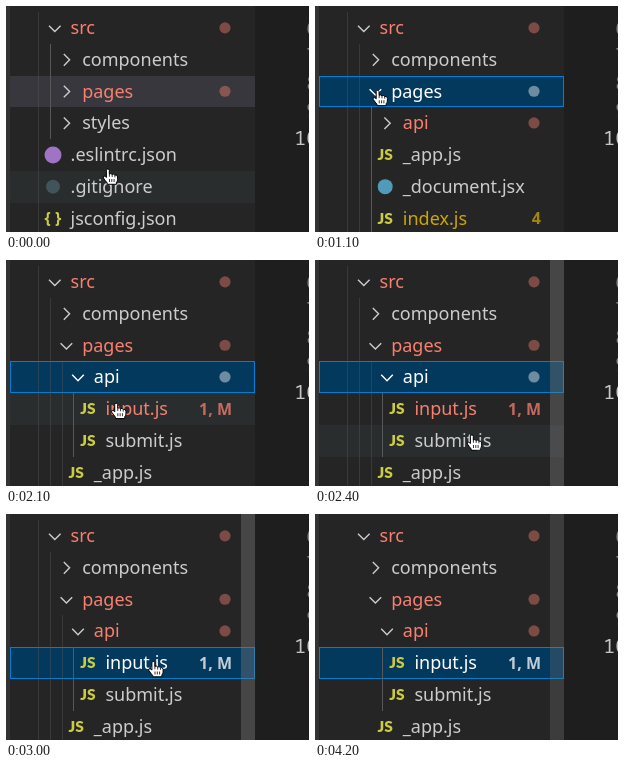
Recreate the animation shown at these times as an HTML page. Size 303 px wide and 226 px high, loop 4300 ms.

```html
<!DOCTYPE html>
<html lang="en">
<head>
<meta charset="utf-8">
<title>File explorer</title>
<style>
  html, body { margin: 0; width: 100%; height: 100%; overflow: hidden; background: #1e1e1e; }
  svg { display: block; width: 303px; height: 226px; }
  text { white-space: pre; }
  .label { font: 18px "Noto Sans", "Open Sans", sans-serif; }
  .badge { font: 700 16px "Noto Sans", "Open Sans", sans-serif; text-anchor: end; opacity: .75; }
  .js { font: 900 15.5px Lato, "Noto Sans", sans-serif; text-anchor: middle; }
  .json { font: 700 16px "Noto Sans", sans-serif; text-anchor: middle; }
  .num { font: 20.3px "Noto Sans Mono", "DejaVu Sans Mono", monospace; }
</style>
</head>
<body>
<svg viewBox="0 0 303 226" width="303" height="226">
  <rect width="303" height="226" fill="#1e1e1e"/>
  <rect width="4" height="226" fill="#333"/>
  <rect x="4" width="245" height="226" fill="#252526"/>
  <g id="lines"></g>
  <g id="tree"></g>
  <rect id="slider" x="235" width="14" height="226" fill="#797979"/>
  <g id="hand">
    <path d="M-1.6 1.2Q-1.6 0-.2 0T1.3 1.2V5Q2.9 4 4.2 5.4Q5.8 4.6 6.9 6.1Q9.5 5.4 9.6 8V10.7Q9.4 12.5 8.4 13.4V15.3H-.8V14Q-2.5 12-4.6 9Q-5.4 7.1-3.6 7.2Q-2.5 7.4-1.6 8.5Z" fill="#fff" stroke="#000" stroke-linejoin="round"/>
    <path d="M1.4 5V7.8M4.2 5.4V8M6.9 6.1V8.4M1.5 10V13M3.8 10V13M6.1 10V13" stroke="#000" stroke-width=".8"/>
  </g>
</svg>
<script>
const LOOP = 4300, STEP = 100;
const TOP = 6.3, ROW = 31.7, INDENT = 11.6;
const RED = '#f88070', GREY = '#cccccc', GOLD = '#cca700';
const $ = id => document.getElementById(id);

const file = (name, depth, icon, color = GREY, badge = '') => ({ name, depth, icon, color, badge });
const folder = (name, depth, color = GREY) => ({ name, depth, color, folder: true });

const src = folder('src', 0, RED), components = folder('components', 1);
const pages = folder('pages', 1, RED), api = folder('api', 2, RED);
const input = file('input.js', 3, 'js', RED, '1, M');
const apiFiles = [input, file('submit.js', 3, 'js')];
const pageFiles = [
  file('_app.js', 2, 'js'),
  file('_document.jsx', 2, 'jsx'),
  file('index.js', 2, 'js', GOLD, '4')
];
const rest = [
  folder('styles', 1),
  file('.eslintrc.json', 0, 'eslint'),
  file('.gitignore', 0, 'git'),
  file('jsconfig.json', 0, 'json')
];

// Cursor stops: time, x, y of the fingertip
const stops = [
  [0, 102, 163], [600, 61, 83], [800, 61, 81], [1000, 61, 81],
  [1600, 85, 126], [1900, 85, 126], [2400, 157, 175],
  [2700, 148, 149], [2800, 147.5, 147.5], [3000, 147.5, 147.5],
  [3500, 165, -20], [LOOP, 165, -20]
];
const HOTSPOT = 3; // pointing height below the fingertip

function cursorAt(t) {
  const i = stops.findIndex(s => s[0] > t);
  const [t0, x0, y0] = stops[i - 1], [t1, x1, y1] = stops[i];
  const p = (t - t0) / (t1 - t0), e = p * p * (3 - 2 * p);
  return [x0 + (x1 - x0) * e, y0 + (y1 - y0) * e];
}

function stateAt(t) {
  const pagesOpen = t >= 1000, apiOpen = t >= 1800;
  const rows = [src, components, pages,
    ...(pagesOpen ? [api] : []),
    ...(apiOpen ? apiFiles : []),
    ...(pagesOpen ? pageFiles : []),
    ...rest].slice(0, 7);
  const selected = t >= 3000 ? input : apiOpen ? api : pages;
  return {
    rows, selected, focused: pagesOpen,
    isOpen: r => r === src || r === pages && pagesOpen || r === api && apiOpen,
    guide: apiOpen ? 3 : pagesOpen ? 2 : 1
  };
}

const rect = (x, y, w, h, fill, more = '') =>
  `<rect x="${x}" y="${y}" width="${w}" height="${h}" fill="${fill}" ${more}/>`;
const circle = (x, y, r, fill, more = '') =>
  `<circle cx="${x}" cy="${y}" r="${r}" fill="${fill}" ${more}/>`;
const text = (kind, x, y, fill, s) =>
  `<text class="${kind}" x="${x}" y="${Math.round(y)}" fill="${fill}">${s}</text>`;

const icons = {
  js: (x, y) => text('js', x, y + 5.2, '#cbcb41', 'JS'),
  json: (x, y) => text('json', x, y + 5.4, '#cbcb41', '{ }'),
  jsx: (x, y) => circle(x, y, 7.5, '#519aba'),
  eslint: (x, y) => circle(x, y, 8.5, '#a074c4'),
  git: (x, y) => circle(x, y, 7, '#41535b')
};

function chevron(x, y, open, color) {
  const d = open ? `M${x - 5.8} ${y - 2.4}l5.8 5.8l5.8-5.8` : `M${x - 2.6} ${y - 5.8}l5.8 5.8l-5.8 5.8`;
  return `<path d="${d}" fill="none" stroke="${color}" stroke-width="1.4"/>`;
}

function drawRow(row, k, state, hovered, guideFade) {
  const mid = TOP + ROW * (k + .5);
  const y = Math.round(TOP + ROW * k), h = Math.round(TOP + ROW * (k + 1)) - y;
  const picked = row === state.selected, active = picked && state.focused;
  const color = active ? '#ffffff' : row.color;
  const shift = row.depth * INDENT;
  let out = '';

  if (active) {
    out += rect(4, y, 245, h, '#04395e');
    out += rect(4.5, y + .5, 244, h - 1, 'none', 'stroke="#007fd4"');
  } else if (picked || hovered) {
    out += rect(4, y, 245, h, picked ? '#37373d' : '#2a2d2e');
  }

  for (let i = 0; i <= row.depth; i++) {
    const alpha = i === state.guide ? 1 : .4 * guideFade;
    out += rect(Math.round(32.4 + INDENT * i), y, 1, h, '#585858', `opacity="${alpha}"`);
  }

  if (row.folder) {
    out += chevron(48.8 + shift, mid, state.isOpen(row), active ? '#ffffff' : GREY);
    if (row.color === RED) out += circle(219, mid - .3, 5.6, color, 'opacity=".42"');
  } else {
    out += icons[row.icon](47 + shift, mid);
  }
  out += text('label', 64.6 + shift, mid + 6.2, color, row.name);
  if (row.badge) out += text('badge', 226, mid + 6, color, row.badge);
  return out;
}

function drawLines() {
  let out = text('num', 288, 139, '#c6c6c6', '10');
  for (let n = 9; n > 5; n--) out += text('num', 300.2, 139 - 27.55 * (10 - n), '#858585', n);
  $('lines').innerHTML = out;
}

const ramp = (t, start, length) => Math.max(0, Math.min(1, (t - start) / length));

function draw(t) {
  const [x, y] = cursorAt(t), state = stateAt(t);
  const over = Math.floor((y + HOTSPOT - TOP) / ROW);
  const guideFade = 1 - ramp(t, 3600, 150);
  const slider = ramp(t, 2100, 200) * (1 - ramp(t, 3950, 800));
  $('tree').innerHTML = state.rows
    .map((row, k) => drawRow(row, k, state, k === over, guideFade)).join('');
  $('slider').setAttribute('opacity', .4 * slider);
  $('hand').setAttribute('transform', `translate(${x} ${y})`);
}

let shown = -1;
const start = performance.now();
function tick() {
  const t = Math.floor((performance.now() - start) % LOOP / STEP) * STEP;
  if (t !== shown) draw(shown = t);
  requestAnimationFrame(tick);
}
drawLines();
tick();
</script>
</body>
</html>
```
